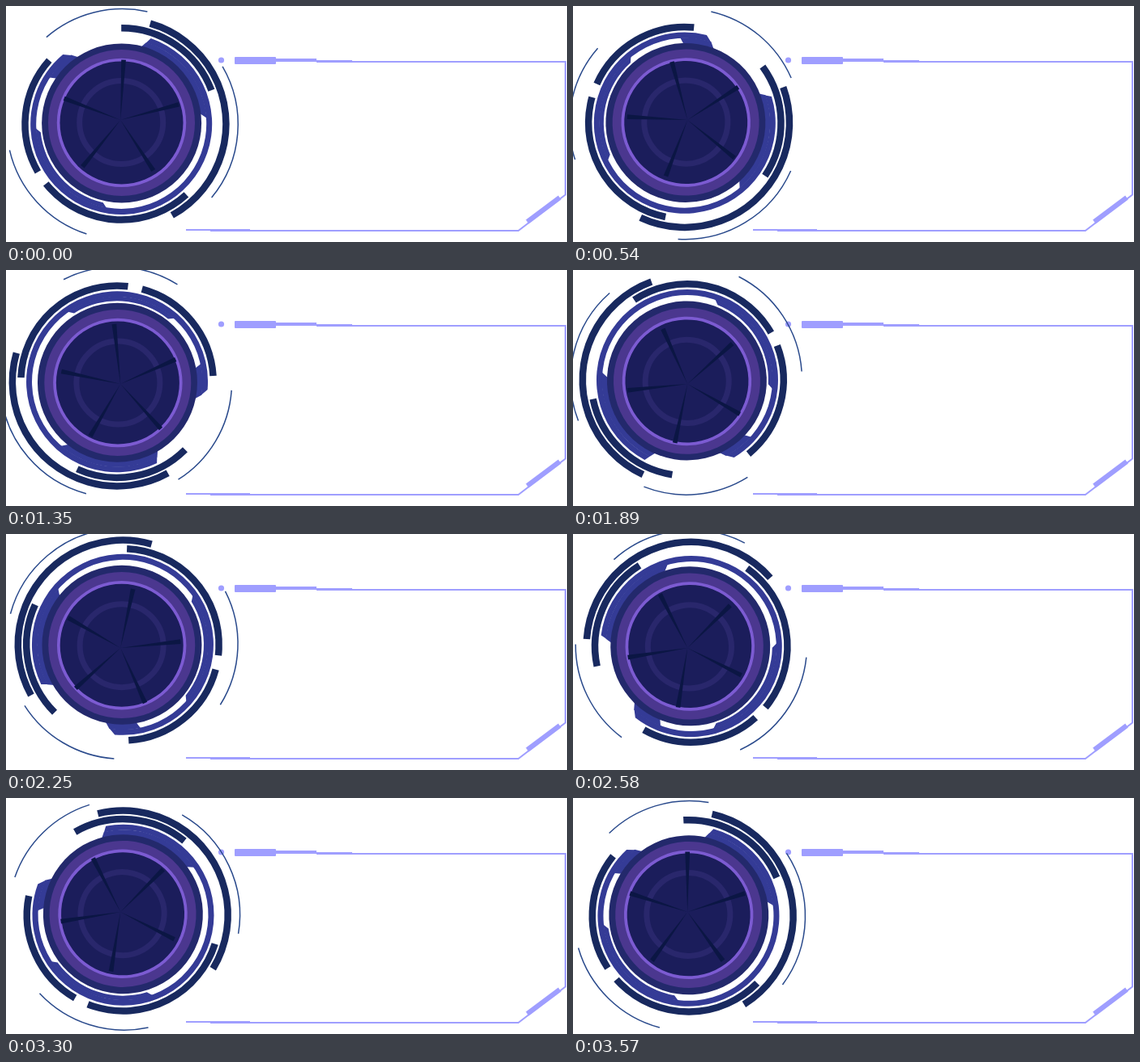
Recreate the animation shown at these times as an HTML page with a canvas. Size 692x292 px, loop 3600 ms.

```html
<!DOCTYPE html>
<html lang="en">
<head>
<meta charset="utf-8">
<title>Rotating dial panel</title>
<style>
  html, body { margin: 0; width: 100%; height: 100%; overflow: hidden; background: #fff; }
  canvas { display: block; }
</style>
</head>
<body>
<canvas id="stage" width="692" height="292"></canvas>
<script>
const ctx = document.getElementById('stage').getContext('2d');
const PIVOT = [141.2, 141];
const STEP = 30, LOOP = 3600;
const LILAC = '#9f9eff', NAVY = '#18295f', BLUE = '#343b96', THIN = '#2a4a8c';

// Angles are in degrees, clockwise from the top.
const rad = deg => (deg - 90) * Math.PI / 180;

function line(width, ...points) {
  ctx.beginPath();
  points.forEach(p => ctx.lineTo(...p));
  ctx.lineWidth = width;
  ctx.stroke();
}

function arc(x, y, r, from, to, width, color) {
  ctx.beginPath();
  ctx.arc(x, y, r, rad(from), rad(to));
  ctx.lineWidth = width;
  ctx.strokeStyle = color;
  ctx.stroke();
}

function disc(x, y, r, color) {
  ctx.beginPath();
  ctx.arc(x, y, r, 0, 2 * Math.PI);
  ctx.fillStyle = color;
  ctx.fill();
}

// Ring segment whose inner and outer edges may end at different angles.
function band(inner, innerFrom, innerTo, outer, outerFrom, outerTo) {
  ctx.beginPath();
  ctx.arc(1, 4.9, outer, rad(outerFrom), rad(outerTo));
  ctx.arc(1, 4.9, inner, rad(innerTo), rad(innerFrom), true);
  ctx.fillStyle = BLUE;
  ctx.fill();
}

function drawFrame() {
  ctx.strokeStyle = ctx.fillStyle = LILAC;
  line(2, [383, 69], [690, 69], [690, 233.5], [632, 278], [252, 278]);
  line(2, [222, 277], [301, 277]);
  line(2, [362, 68], [427, 68]);
  line(4, [332, 67], [383, 67]);
  line(6, [643, 267], [683, 237]);
  ctx.beginPath();
  ctx.roundRect(282, 63, 51, 9, 1);
  ctx.fill();
  disc(265.5, 67, 3.6, LILAC);
}

function drawWheel() {
  [[319, 372.5], [60, 129.5], [198, 257]].forEach(([a, b]) => arc(2.3, 5.3, 142.7, a, b, 1.5, THIN));

  arc(1, 4.9, 129.2, 16, 151, 8.5, NAVY);
  [[0, 69.5], [137.5, 231.5], [240, 311.5]].forEach(([a, b]) => arc(1, 4.9, 118.7, a, b, 8.5, NAVY));

  band(105, 17, 324, 112, 19, 320);
  band(95, 13, 81, 105.5, 17, 86);
  band(100, 193, 264, 105.5, 190, 267);
  band(95, 306, 329, 105.5, 303, 324);

  disc(1.4, 3.9, 98.5, '#23296c');
  disc(1.3, 3.5, 90.5, '#4b378f');
  disc(1.3, 3.4, 79.7, '#7c5bd2');
  disc(1.3, 3.4, 76, '#1b1d5b');
  arc(1, 3, 51.5, 0, 360, 7, '#29276c');

  ctx.fillStyle = '#0b1644';
  for (let angle = 3; angle < 360; angle += 72) {
    ctx.beginPath();
    ctx.moveTo(0, 0);
    ctx.arc(0, 0, 74.5, rad(angle - 2.2), rad(angle + 2.2));
    ctx.fill();
  }
}

function render() {
  const step = Math.floor(performance.now() % LOOP / STEP);
  ctx.clearRect(0, 0, 692, 292);
  drawFrame();
  ctx.save();
  ctx.translate(...PIVOT);
  ctx.rotate(step * STEP / LOOP * 2 * Math.PI);
  drawWheel();
  ctx.restore();
  requestAnimationFrame(render);
}
render();
</script>
</body>
</html>
```
